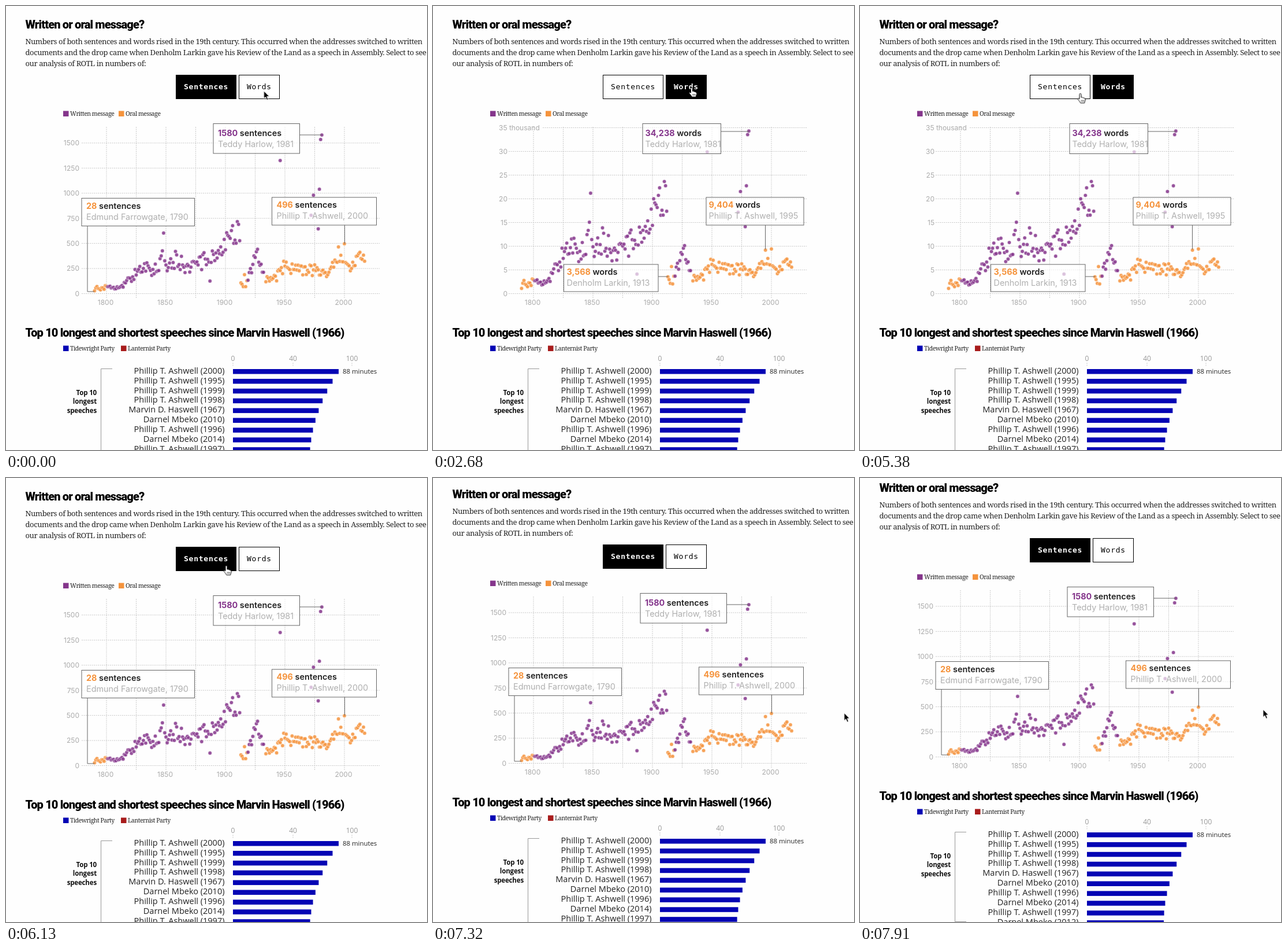
Write an HTML page that moves like this. It is 729 by 768 pixels and loops after 8 s.

```html
<!DOCTYPE html>
<html lang="en">
<head>
<meta charset="utf-8">
<title>Written or oral message?</title>
<style>
html, body { margin: 0; width: 100%; height: 100%; overflow: hidden; background: #fefefe; }
svg { display: block; width: 729px; height: 768px; }
text { white-space: pre; }
.heading { font: 800 20px Roboto, sans-serif; letter-spacing: -.86px; fill: #000; }
.body { font: 13px "Noto Serif", serif; letter-spacing: -.4px; fill: #222; }
.legend { font: 10.4px "Noto Serif", serif; letter-spacing: -.45px; fill: #222; }
.button { font: 13px "DejaVu Sans Mono", monospace; letter-spacing: .75px; }
.active { font-weight: 700; }
.axis { font: 12px Inter, sans-serif; fill: #aaa; }
.value { font: 600 14.4px Inter, sans-serif; fill: #222; }
.value tspan { font-weight: 700; }
.who { font: 14.4px Inter, sans-serif; fill: #b0b0b0; }
.name { font: 14.5px "Open Sans", sans-serif; fill: #222; }
.scale { font: 12px "Open Sans", sans-serif; fill: #999; }
.minutes { font: 500 11.4px "Open Sans", sans-serif; fill: #222; }
.group { font: 700 11.5px "Open Sans", sans-serif; letter-spacing: -.15px; fill: #111; }
.grid { stroke: #c8c8c8; stroke-dasharray: 2 1.5; }
.box { fill: #fff; fill-opacity: .65; stroke: #666; }
.lead { fill: none; stroke: #666; }
.frame { fill: none; stroke: #999; }

#page, #pointer, #arrow, #hand, #sentences, #words { animation: 8s step-end infinite; }
#page { animation-name: scroll; }
#pointer { animation-name: move; }
#arrow { animation-name: arrow; }
#hand { animation-name: hand; }
#sentences { animation-name: sentences; }
#words { animation-name: words; }

@keyframes scroll {
  0% { transform: translateY(0); }
  91.5% { transform: translateY(-4px); animation-timing-function: steps(4); }
  98.875%, 100% { transform: translateY(-15px); }
}
@keyframes sentences {
  0%, 76.625%, 100% { visibility: visible; }
  31.625% { visibility: hidden; }
}
@keyframes words {
  0%, 76.625%, 100% { visibility: hidden; }
  31.625% { visibility: visible; }
}
@keyframes arrow {
  0%, 48.5%, 78.5%, 100% { visibility: visible; }
  3.75%, 67.25% { visibility: hidden; }
}
@keyframes hand {
  0%, 48.5%, 78.5%, 100% { visibility: hidden; }
  3.75%, 67.25% { visibility: visible; }
}
@keyframes move {
  0% { transform: translate(446.5px, 147px); animation-timing-function: steps(2); }
  3.75% { transform: translate(446.5px, 139px); }
  16.75% { transform: translate(448px, 141px); }
  48.5% { transform: translate(491.5px, 160px); animation-timing-function: steps(4); }
  56% { transform: translate(702px, 452px); animation-timing-function: steps(2); }
  59.75% { transform: translate(697px, 459px); animation-timing-function: steps(4); }
  67.25% { transform: translate(381.5px, 151.5px); }
  76.625% { transform: translate(381.5px, 151.5px); animation-timing-function: steps(4); }
  84% { transform: translate(704px, 400px); }
  85.875% { transform: translate(712px, 406.5px); }
  93.25% { transform: translate(712px, 406.5px); animation-timing-function: steps(3); }
  98.875%, 100% { transform: translate(698px, 400.5px); }
}
</style>
</head>
<body>
<svg viewBox="0 0 729 768">
  <g id="page">
    <g id="static"></g>
    <g id="sentences"></g>
    <g id="words"></g>
  </g>
  <g id="pointer">
    <path id="arrow" d="M0 0V13.2L3 10.4L5.2 15.6L7.5 14.6L5.3 9.6H9.4Z" fill="#000" stroke="#fff" stroke-width=".9"/>
    <g id="hand" fill="#fff" stroke="#000" stroke-linejoin="round">
      <path d="M-1.5 9V1.5a1.5 1.5 0 0 1 3 0V6.5q2.6-.8 2.9.8q2.3-.6 2.5.9q2-.2 1.9 1.8c0 3-1.4 3.5-1.5 6.2H.3C-.8 13.5-4 10.8-4.5 9.2q1-2 3 0Z"/>
      <path d="M2 11v3M4 11v3M6 11v3" stroke-width=".7"/>
    </g>
  </g>
</svg>
<script>
const PURPLE = '#85368c', ORANGE = '#f5933c', BLUE = '#0404b4', RED = '#a81c1c';
const BASE = 497.5;
const yearX = year => 174 + (year - 1800) * 2.06;
const countY = count => BASE - count * .1737;
const thousandY = thousand => BASE - thousand * 8.2;

const line = (x1, y1, x2, y2, cls) => `<path class="${cls}" d="M${x1} ${y1}L${x2} ${y2}"/>`;
const text = (x, y, str, cls, anchor = 'start', fill = '') =>
  `<text x="${x}" y="${y}" class="${cls}" text-anchor="${anchor}"${fill && ` style="fill:${fill}"`}>${str}</text>`;
const rect = (x, y, w, h, fill) => `<rect x="${x}" y="${y}" width="${w}" height="${h}" fill="${fill}"/>`;
const legend = (x, y, color, label) => rect(x, y, 9.5, 9.5, color) + text(x + 12, y + 8.5, label, 'legend');

// Linear interpolation between key points [year, ...values]
function interpolate(keys, year) {
  const i = Math.max(1, keys.findIndex(key => key[0] >= year));
  const from = keys[i - 1], to = keys[i];
  const k = (year - from[0]) / (to[0] - from[0]);
  return from.slice(1).map((v, j) => v + (to[j + 1] - v) * k);
}
const noise = n => { const v = Math.sin(n * 12.9898) * 43758.5453; return 2 * (v - Math.floor(v)) - 1; };

// Sentences per address: [year, mean, spread]
const written = [[1801, 65, 20], [1812, 65, 20], [1825, 205, 50], [1835, 260, 85], [1843, 230, 70], [1847, 430, 110],
  [1851, 290, 75], [1858, 370, 130], [1866, 265, 70], [1876, 275, 75], [1886, 370, 90], [1896, 420, 60], [1912, 710, 190]];
const between = [[1919, 110, 50], [1926, 450, 70], [1932, 200, 60]];
const oral = [[1790, 55, 22], [1800, 60, 20], [1913, 145, 80], [1934, 130, 45], [1943, 165, 40], [1950, 285, 70],
  [1962, 235, 70], [1988, 215, 55], [1995, 390, 60], [2002, 260, 50], [2008, 275, 40], [2011, 400, 35], [2017, 340, 50]];
const known = { 1790: 28, 1848: 603, 1887: 125, 1913: 107, 1995: 465, 2000: 496 };
const lateWritten = { 1946: 1325, 1972: 780, 1974: 980, 1978: 645, 1979: 1040, 1980: 1535, 1981: 1580 };

const dots = [];
function scatter(from, to, keys, color) {
  for (let year = from; year <= to; year++) {
    const [mean, spread] = interpolate(keys, year);
    dots.push({ year, count: known[year] ?? mean + spread * noise(year), color });
  }
}
scatter(1790, 1800, oral, ORANGE);
scatter(1801, 1912, written, PURPLE);
scatter(1913, 1918, oral, ORANGE);
scatter(1919, 1932, between, PURPLE);
scatter(1934, 2017, oral, ORANGE);
Object.entries(lateWritten).forEach(([year, count]) => dots.push({ year: +year, count, color: PURPLE }));

// Average words per sentence
const lengths = [[1790, 39], [1825, 40], [1858, 33], [1913, 33], [1924, 23], [1980, 21.85], [2000, 19], [2017, 17.3]];
const sentenceY = d => countY(d.count);
const wordY = d => thousandY(d.count * interpolate(lengths, d.year)[0] / 1000);

const plot = toY => dots.map(d =>
  `<circle cx="${yearX(d.year).toFixed(1)}" cy="${toY(d).toFixed(1)}" r="3.2" fill="${d.color}" fill-opacity=".86" stroke="#fff" stroke-width=".5"/>`).join('');

function grid(step, steps, toY, labelX, topLabel) {
  let out = '';
  for (let year = 1800; year <= 2000; year += 25) {
    const x = yearX(year);
    out += line(x, 209, x, 505, 'grid');
    if (year % 50 === 0) out += text(x - 1.5, 516.5, year, 'axis', 'middle');
  }
  for (let i = 0; i <= steps; i++) {
    const y = toY(i * step), top = topLabel && i === steps;
    out += line(top ? 190 : 131, y, 647, y, 'grid') +
      (top ? text(114, y + 4.3, topLabel, 'axis') : text(labelX, y + 4.3, i * step, 'axis', 'end'));
  }
  return out;
}

function callout(x, y, w, h, inset, lead, color, count, unit, who) {
  const tx = x + inset, ty = y + (h > 50 ? 21 : 18.3);
  return `<path class="lead" d="${lead}"/><rect class="box" x="${x}" y="${y}" width="${w}" height="${h}"/>` +
    text(tx, ty, `<tspan fill="${color}">${count}</tspan> ${unit}`, 'value') + text(tx, ty + 19, who, 'who');
}

function button(x, w, label, active) {
  return `<rect x="${x}" y="119.5" width="${w}" height="41" fill="${active ? '#000' : '#fff'}" stroke="#000"/>` +
    text(x + 13.5, 144, label, active ? 'button active' : 'button', 'start', active ? '#fff' : '#000');
}
const buttons = words => button(294.5, 104, 'Sentences', !words) + button(403.5, 70, 'Words', words);

const ashwell = 'Phillip T. Ashwell', mbeko = 'Darnel Mbeko', haswell = 'Marvin D. Haswell';

document.getElementById('sentences').innerHTML = buttons(false) + grid(250, 6, countY, 127) + plot(sentenceY) +
  callout(359, 203.5, 149.5, 51.5, 8, 'M508 223H547', PURPLE, '1580', 'sentences', 'Teddy Harlow, 1981') +
  callout(131, 332.5, 195.5, 48, 8, 'M141 380V494H153', ORANGE, '28', 'sentences', 'Edmund Farrowgate, 1790') +
  callout(460.5, 331, 181, 48, 8, 'M586.5 379V411', ORANGE, '496', 'sentences', `${ashwell}, 2000`);

document.getElementById('words').innerHTML = buttons(true) + grid(5, 7, thousandY, 129, '35 thousand') + plot(wordY) +
  callout(363, 203.5, 135.5, 52, 4.5, 'M498 217H547', PURPLE, '34,238', 'words', 'Teddy Harlow, 1981') +
  callout(473, 331, 169, 48, 4.5, 'M575.5 379V421', ORANGE, '9,404', 'words', `${ashwell}, 1995`) +
  callout(226.5, 447, 163.5, 47, 5, 'M390 468H407', ORANGE, '3,568', 'words', 'Denholm Larkin, 1913');

const paragraph = [
  'Numbers of both sentences and words rised in the 19th century. This occurred when the addresses switched to written',
  'documents and the drop came when Denholm Larkin gave his Review of the Land as a speech in Assembly. Select to see',
  'our analysis of ROTL in numbers of:'
];
const speeches = [
  [ashwell, 2000], [ashwell, 1995], [ashwell, 1999], [ashwell, 1998], [haswell, 1967],
  [mbeko, 2010], [ashwell, 1996], [mbeko, 2014], [ashwell, 1997], [mbeko, 2012]
];
const barWidth = rank => 133 + 50 * (1 - rank / 9) ** 2;

document.getElementById('static').innerHTML =
  text(33.5, 39, 'Written or oral message?', 'heading') +
  paragraph.map((str, i) => text(33.5, 66 + i * 18.8, str, 'body')).join('') +
  legend(99, 181.5, PURPLE, 'Written message') + legend(195, 181.5, ORANGE, 'Oral message') +
  text(33.5, 572, 'Top 10 longest and shortest speeches since Marvin Haswell (1966)', 'heading') +
  legend(99, 587.5, BLUE, 'Tidewright Party') + legend(199, 587.5, RED, 'Lanternist Party') +
  [[393, '0'], [497, '40'], [599, '100']].map(([x, label]) =>
    text(x, 613.5, label, 'scale', 'middle') + line(x, 617, x, 623, 'grid')).join('') +
  speeches.map(([who, year], i) => {
    const y = 628 + i * 16.9;
    return text(378.5, y + 7.7, `${who} (${year})`, 'name', 'end') + rect(393, y, barWidth(i), 8.5, BLUE);
  }).join('') +
  text(583, 636, '88 minutes', 'minutes') +
  '<path class="frame" d="M184 627.5H164.5V782.5H184"/>' +
  ['Top 10', 'longest', 'speeches'].map((str, i) => text(157, 673 + i * 15.3, str, 'group', 'end')).join('');
</script>
</body>
</html>
```
